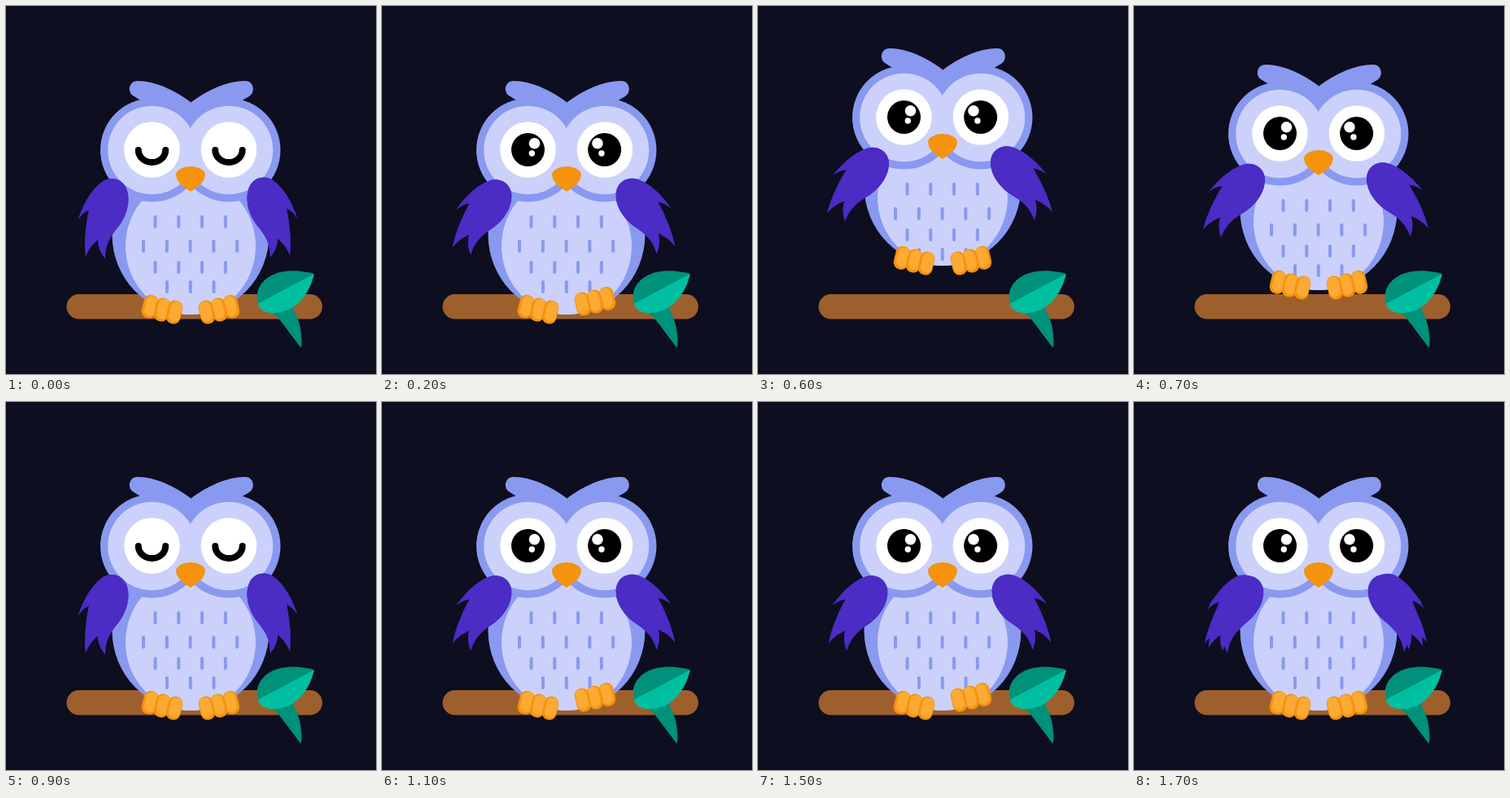
An HTML page that plays this animation: 455x452 px, repeating every 1.8 s.

```html
<!DOCTYPE html>
<html lang="en">
<head>
<meta charset="utf-8">
<title>Hopping owl</title>
<style>
  html, body { margin: 0; width: 100%; height: 100%; overflow: hidden; background: #0d0e1f; }
  svg { display: block; width: 100vw; height: 100vh; }
  .rim { fill: #8999f0; }
  .pale { fill: #cbd1fb; }
  .wing { fill: #4b2cc4; }
  .beak { fill: #f5930e; }
  .toe { fill: #fbaa33; }
  .dark-leaf { fill: #00917a; }
  .marks { fill: none; stroke: #8999f0; stroke-width: 4; stroke-linecap: round; }
  .lids { fill: none; stroke: #000; stroke-width: 8; stroke-linecap: round; }
</style>
</head>
<body>
<svg viewBox="0 0 455 452">
  <defs>
    <path id="wing" class="wing" d="M118 216C126 210 140 210 147 222C155 238 148 258 139 270C131 280 122 290 122 310C116 303 113 295 113 287C107 292 101 299 98 308C96 290 98 270 102 250C96 253 92 257 89 262C94 246 104 226 118 216Z"/>
    <g id="toe">
      <rect class="beak" x="-9" y="-14.5" width="18" height="29" rx="8.5"/>
      <rect class="toe" x="-6" y="-13.5" width="14" height="25" rx="7"/>
    </g>
    <g id="foot">
      <use href="#toe" transform="translate(177 369.3) rotate(13)"/>
      <use href="#toe" transform="translate(192 373) rotate(13)"/>
      <use href="#toe" transform="translate(207 376) rotate(13)"/>
    </g>
  </defs>

  <rect x="74.5" y="354" width="314.5" height="30.5" rx="15.2" fill="#9d602d"/>
  <path class="dark-leaf" d="M328 376C340 388 350 404 363 420C365 402 361 385 352 370Z"/>
  <path class="dark-leaf" d="M310 366C302 342 328 315 379 329L345 360Z"/>
  <path fill="#00bfa0" d="M310 365.500L379 329C373 355 355 378 326 377C317 376 311 372 310 365.500Z"/>

  <g id="body">
    <ellipse class="rim" cx="227" cy="281" rx="96.500" ry="98"/>
    <ellipse class="pale" cx="227" cy="295" rx="80" ry="84"/>
  </g>
  <g id="head">
    <path id="marks" class="marks"/>
    <g class="rim">
      <path d="M227.500 118.500C246 104 272 92 294 92C305 92 307 106 299 111L292 115L227.500 190L164 115L156 110C149 105 151 92 162 92C183 92 209 104 227.500 118.500Z"/>
      <circle cx="179.500" cy="177" r="63.500"/>
      <circle cx="274" cy="177" r="63.500"/>
    </g>
    <g class="pale">
      <circle cx="179.500" cy="177" r="54.300"/>
      <circle cx="274" cy="177" r="54.300"/>
    </g>
    <g fill="#fff">
      <circle cx="179.500" cy="176.500" r="34.300"/>
      <circle cx="274" cy="176.500" r="34.300"/>
    </g>
    <g id="open" fill="#fff">
      <circle cx="179.500" cy="176.500" r="20.500" fill="#000"/>
      <circle cx="273.700" cy="176.500" r="20.500" fill="#000"/>
      <circle cx="187.500" cy="168.800" r="6.800"/>
      <circle cx="265" cy="168.800" r="6.800"/>
      <circle cx="184.300" cy="181" r="3.700"/>
      <circle cx="270" cy="181" r="3.700"/>
    </g>
    <path id="closed" class="lids" d="M162.800 177a16.700 15 0 0 0 33.400 0M257.300 177a16.700 15 0 0 0 33.400 0"/>
    <path class="beak" d="M209 206C211 200 220 197 227 197S243 200 245 206C245 217 236 222 227 228C218 222 209 217 209 206Z"/>
    <g id="wings">
      <use href="#wing"/><use href="#wing"/>
      <g transform="translate(447 -1.500) scale(-1 1)"><use href="#wing"/><use href="#wing"/></g>
    </g>
  </g>
  <use id="left" href="#foot"/>
  <g id="right"><use href="#foot" transform="translate(454 0) scale(-1 1)"/></g>
</svg>
<script>
const $ = id => document.getElementById(id);
const wings = document.querySelectorAll('#wings use');

const rows = [[183.5, 259, 4], [169, 289, 5], [183.5, 315, 4], [198, 339, 3]];
$('marks').setAttribute('d', rows.map(([x, y, count]) =>
  Array.from({ length: count }, (_, i) => `M${x + i * 28.8} ${y}v12`).join('')).join(''));

const STEP = 100;
const pose = (wing, extra) => ({ wing, wing2: wing, spread: 0, head: 0, body: 0, left: 0, right: 0, open: true, ...extra });
const asleep = pose(0, { open: false });
const stand = pose(9);
const stepRight = pose(17, { right: -10 });
const stepLeft = pose(9, { left: -10 });
const rise = pose(20, { head: -20, body: -30 });
const high = pose(20, { head: -40, body: -60 });
const peak = pose(34, { head: -58, body: -70, spread: -9 });
const settle = pose(9, { wing2: 17 });
const poses = [
  asleep, stand, stepRight, rise, high, peak, high, rise, stand,
  asleep, stand, stepRight, stand, stepLeft, stand, stepRight, stand, settle
];

function move(id, y) {
  $(id).setAttribute('transform', `translate(0 ${y})`);
}

function draw(now) {
  const p = poses[Math.floor(now / STEP) % poses.length];
  move('head', p.head);
  move('body', p.body);
  move('left', p.body + p.left);
  move('right', p.body + p.right);
  $('open').style.display = p.open ? '' : 'none';
  $('closed').style.display = p.open ? 'none' : '';
  wings.forEach((wing, i) => wing.setAttribute('transform',
    `translate(${p.spread} 0) rotate(${i % 2 ? p.wing2 : p.wing} 131 265)`));
}

let start;
function tick(now) {
  start ??= now;
  draw(Math.max(0, now - start));
  requestAnimationFrame(tick);
}
draw(0);
requestAnimationFrame(tick);
</script>
</body>
</html>
```
